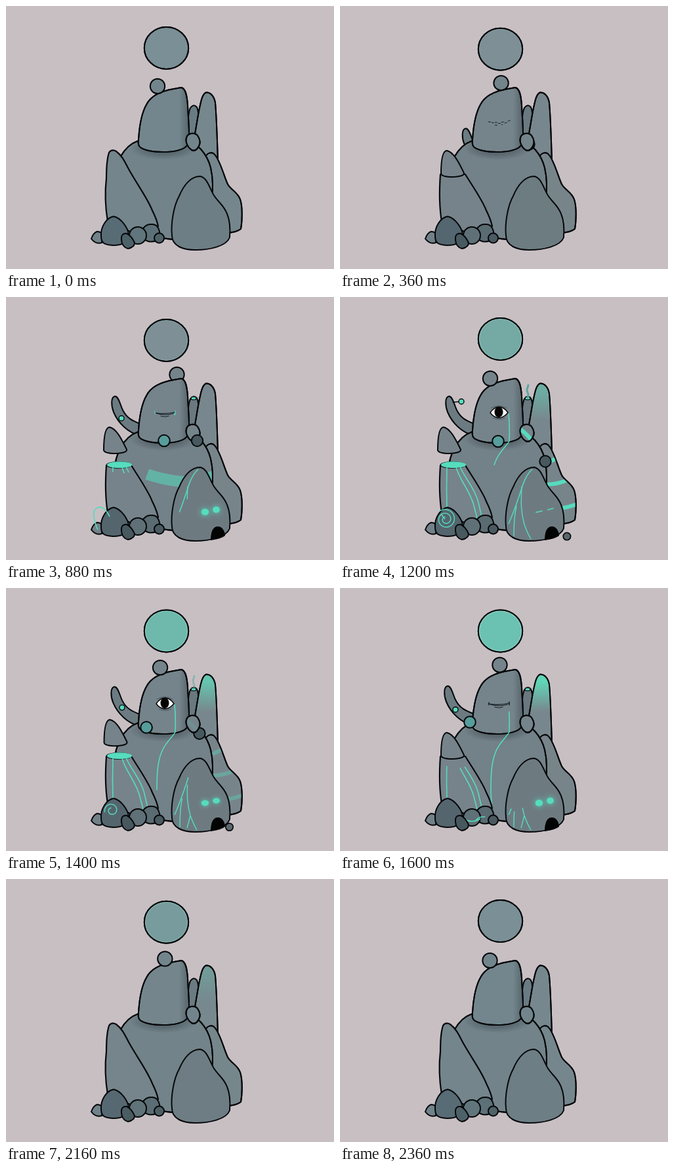
Recreate the animation shown at these times as an HTML page with a canvas. Size 500x400 px, loop 2.4 s.

```html
<!DOCTYPE html>
<html>
<head>
<meta charset="utf-8">
<style>
html, body { margin: 0; width: 100%; height: 100%; overflow: hidden; background: #c8bfc3; }
canvas { display: block; }
</style>
</head>
<body>
<canvas id="stage" width="500" height="400"></canvas>
<script>
const ctx = document.getElementById('stage').getContext('2d');
const LOOP = 2400, STEP = 40;
const INK = '#06080a', GLOW = '#56dcbe', ROCK = '#75848b';
let t = 0, calm = 0;

const shapes = {
  tallSpire: 'M323 236C322 205 321 168 319 147C317 136 311 131 305 131.5C299 134 297 145 294 160C291 176 289 190 286 205L300 240Z',
  shortSpire: 'M279 200C277 180 277 164 281 155Q286 148 291 154Q294 160 293 174L290 205Z',
  rightRock: 'M303 231C307 222 315 221 319 227C327 237 332 258 338 271C343 280 353 283 357 294C361 306 360 328 358 339Q352 344 338 345L308 310Z',
  horn: 'M203 210C187 207 171 192 164 175C160 165 160 152 166 151C172 151 174 164 178 172C184 184 192 188 205 193Z',
  body: 'M166 256C170 229 185 207 209 203H272C292 207 307 226 312 246C316 263 316 280 313 300L280 355Q245 357 226 349L180 310Z',
  head: 'M202 203C203 187 206 164 214 150C221 136 238 129 256 126L267 124C274 125 276 137 277 151C278 177 281 197 277 210C274 219 255 222 239 222C223 222 207 219 203 213Q201 209 202 203Z',
  diamond: 'M276 198C279 193 288 192 292 197C296 203 297 208 294 213C291 219 287 221 283 219C277 215 272 206 276 198Z',
  column: 'M155 328C152 310 150 288 153 262C153 246 154 232 157 223Q161 217 168 221C179 229 183 242 191 255C202 274 217 295 223 311Q230 325 232 335L205 350Z',
  stump: 'M155 328C152 310 151 284 153 256H191C202 274 217 295 223 311Q230 325 232 335L205 350Z',
  cap: 'M154 255C154 242 155 220 163 220C174 222 183 242 189 254Q190 259 172 260Q155 260 154 255Z',
  frontRock: 'M253 349C251 330 256 303 264 289C271 272 282 259 296 259C307 261 310 277 317 288C324 299 332 303 337 316C342 328 342 340 341 352C336 365 312 371 288 371C270 371 253 365 253 349Z',
  stoneE: 'M208 340Q213 331 222 332Q231 331 234 343Q236 353 229 357Q217 361 210 354Z',
  stoneW: 'M130 354Q133 345 139 343Q146 343 147 350L146 360Q137 363 130 354Z',
  boulder: 'M145 350C144 336 153 322 164 320C175 322 187 338 187 349C186 361 175 364 163 364C150 363 145 361 145 350Z',
  chip: 'M176 356Q175 345 184 346Q191 349 196 360Q196 367 186 369Q177 367 176 356Z',
  almond: 'M229 176Q235 167 243 167Q251 168 256 176Q249 184 242 184Q234 183 229 176Z',
  door: 'M312 370C312 356 316 349 323 349C330 349 334 357 334 363Q328 368 312 370Z'
};
for (const k in shapes) shapes[k] = new Path2D(shapes[k]);

function spiral() {
  let d = 'M';
  for (let i = 0; i <= 60; i++) {
    const a = -2.3 + i * .22, r = 15.5 - i * .2;
    d += `${i ? 'L' : ''}${161 + r * Math.cos(a)} ${338 + r * Math.sin(a)}`;
  }
  return d;
}

// Glowing lines with their measured lengths
const line = d => {
  const el = document.createElementNS('http://www.w3.org/2000/svg', 'path');
  el.setAttribute('d', d);
  return { path: new Path2D(d), length: el.getTotalLength() };
};
const lines = {
  tear: line('M257 177Q259 200 258 219C255 226 243 234 237 250C230 267 230 290 230 312L233 354'),
  belt: line('M164 236C188 264 225 276 268 281Q300 281 322 270'),
  vine: line('M293 262C281 273 278 289 273 303C268 318 264 329 257 345'),
  vineB: line('M277 288C276 310 275 325 281 346Q286 360 291 368'),
  vineC: line('M269 318C265 335 265 350 265 364'),
  vineD: line('M281 346L276 365'),
  streamA: line('M163 259Q162 290 163 323'),
  streamB: line('M177 259C182 278 199 296 204 317L209 336'),
  streamC: line('M183 258C189 274 207 292 212 317L216 334'),
  pool: line('M188 350Q200 359 214 351'),
  poolB: line('M207 353Q214 346 224 349T240 350'),
  arch: line('M140 354C135 343 129 324 140 320C149 318 154 326 158 334'),
  spiral: line(spiral()),
  needle: line('M154 330L160 338')
};

const clamp = x => Math.max(0, Math.min(1, x));
const ease = x => x * x * (3 - 2 * x);
const linear = (a, b) => clamp((t - a) / (b - a));
const ramp = (a, b) => ease(linear(a, b));
const pulse = (a, b, c, d) => ramp(a, b) * (1 - ramp(c, d));

// Eased value of rows [time, ...values]
function keys(...rows) {
  let i = rows.findIndex(r => r[0] > t);
  if (i < 0) return rows[rows.length - 1].slice(1);
  if (i === 0) return rows[0].slice(1);
  const a = rows[i - 1], b = rows[i], k = ease((t - a[0]) / (b[0] - a[0]));
  return a.slice(1).map((v, n) => v + (b[n + 1] - v) * k);
}

function scoped(draw) { ctx.save(); draw(); ctx.restore(); }

function outline(path, width = 2, color = INK) {
  ctx.lineWidth = width;
  ctx.strokeStyle = color;
  ctx.stroke(path);
}

function rock(path, fill = ROCK, width = 2) {
  ctx.fillStyle = fill;
  ctx.fill(path);
  ctx.fillStyle = `rgba(105,145,150,${.17 * calm})`;
  ctx.fill(path);
  outline(path, width);
}

function oval(x, y, rx, ry = rx) {
  const p = new Path2D();
  p.ellipse(x, y, Math.max(0, rx), Math.max(0, ry), 0, 0, 7);
  return p;
}

function fade(x0, y0, x1, y1, from, to) {
  const g = ctx.createLinearGradient(x0, y0, x1, y1);
  g.addColorStop(0, from);
  g.addColorStop(1, to);
  return g;
}

function trace(name, tail, tip, width = 1.6, color = GLOW) {
  if (tip <= tail) return;
  const { path, length } = lines[name];
  scoped(() => {
    ctx.lineCap = 'butt';
    ctx.setLineDash([(tip - tail) * length, length * 2]);
    ctx.lineDashOffset = -tail * length;
    outline(path, width, color);
  });
}

function stroke(d, width, color) { outline(new Path2D(d), width, color); }

function orb(glow) {
  const y = 64.9 - Math.cos(t * Math.PI / 300);
  const disc = oval(244.5, y, 33.7, 32);
  rock(disc, '#7e8f96');
  ctx.fillStyle = `rgba(104,208,186,${.8 * glow})`;
  ctx.fill(disc);
  outline(oval(244.5, y, 32, 30.4), 1.2, `rgba(150,215,203,${.3 * pulse(200, 600, 2100, 2400) + .5 * glow})`);
  outline(disc);
}

function backdrop(glow) {
  rock(shapes.shortSpire, '#6a787f');
  const vent = pulse(680, 840, 1640, 1800);
  if (vent > 0) {
    const hole = oval(286, 154, 4 * vent, 2.4 * vent);
    ctx.fillStyle = GLOW;
    ctx.fill(hole);
    outline(hole, 1.2);
  }
  const smoke = pulse(960, 1180, 1300, 1500);
  if (smoke > 0) scoped(() => {
    ctx.globalAlpha = smoke;
    stroke('M286 153C290 147 282 143 286 138L287 134', 3, '#5aa7a0');
  });
  rock(shapes.tallSpire, '#78878d');
  ctx.fillStyle = fade(0, 142, 0, 188, `rgba(94,222,188,${.9 * glow})`, 'rgba(94,222,188,0)');
  ctx.fill(shapes.tallSpire);
  outline(shapes.tallSpire);

  rock(shapes.rightRock, '#77858b');
  const bands = pulse(980, 1160, 1280, 1480);
  if (bands > 0) scoped(() => {
    ctx.clip(shapes.rightRock);
    ctx.globalAlpha = bands;
    stroke('M316 252L331 245M315 285Q331 285 345 279M335 322Q348 320 362 315', 6, GLOW);
  });
  outline(shapes.rightRock);
}

function horn() {
  const [dx, dy] = keys([240, 42, 58], [520, 0, 0], [1240, 0, 0], [1600, -2, -2], [1720, 0, 2], [1920, 34, 46], [2040, 42, 58]);
  if (dx < 42) scoped(() => {
    ctx.translate(dx, dy);
    rock(shapes.horn, '#6c7b82');
  });
  if (t < 440 || t > 2040) return;
  const [x, y] = keys([440, 186, 200], [560, 176, 183.5], [920, 176, 184.5], [1120, 185, 159], [1240, 185, 159],
    [1440, 176, 184.5], [1640, 176, 185], [1920, 182.5, 214], [2040, 190, 228]);
  const stalk = pulse(960, 1080, 1280, 1400);
  if (stalk > .2) stroke(`M172 160L${x} ${y}`, 1.3);
  const bead = oval(x, y, 4);
  ctx.fillStyle = GLOW;
  ctx.fill(bead);
  outline(bead, 1.4);
}

function body() {
  rock(shapes.body, '#738188');
  scoped(() => {
    ctx.clip(shapes.body);
    trace('belt', linear(640, 1140) * .75 + linear(1000, 1120) * .25, linear(360, 720), 17, '#63b2a6');
    ctx.translate(240, 216);
    ctx.scale(1, .35);
    const shade = ctx.createRadialGradient(0, 0, 15, 0, 0, 52);
    shade.addColorStop(0, 'rgba(25,35,40,.4)');
    shade.addColorStop(1, 'rgba(25,35,40,0)');
    ctx.fillStyle = shade;
    ctx.fillRect(-60, -60, 120, 120);
  });
  outline(shapes.body);
}

function eye() {
  if (t < 280 || t > 2120) return;
  const open = pulse(400, 540, 780, 880) + pulse(900, 1040, 1440, 1580);
  if (open > .05) scoped(() => {
    ctx.translate(0, 176 * (1 - open));
    ctx.scale(1, open);
    ctx.fillStyle = '#f6f5f3';
    ctx.fill(shapes.almond);
    scoped(() => {
      ctx.clip(shapes.almond);
      ctx.fillStyle = '#050506';
      ctx.fill(oval(242, 175, 6.5, 8.2));
    });
    outline(shapes.almond, 1.5);
    stroke('M230 169Q242 162 254 169M233 184Q243 189 252 184', .7, '#3c474c');
  });
  else if (t < 400 || t > 1700) scoped(() => {
    ctx.globalAlpha = pulse(240, 360, 1920, 2120);
    ctx.lineCap = 'butt';
    ctx.setLineDash([4, 6]);
    stroke('M226 176Q242 179 260 174M231 177Q242 180 256 177M236 181Q242 182 248 180', 1, '#172024');
  });
  else {
    stroke('M227 176Q242 179 258 175M229 177Q242 181 256 177M236 181Q242 183 248 181', 1.2, '#172024');
    stroke('M227 174V178M258 173V178', 1.2, t < 1000 ? GLOW : INK);
  }
}

function head() {
  const [x, y] = keys([0, 231, 122], [400, 246, 117], [600, 262.5, 120], [740, 264, 120], [880, 260.5, 118],
    [1200, 229, 124], [1240, 229, 124], [1600, 243.5, 117], [1780, 262, 119], [1920, 260.5, 118], [2360, 228.5, 124], [2400, 231, 122]);
  const topBall = () => rock(oval(x, y, 11.2));
  const [nx, ny] = keys([360, 215, 201], [520, 199, 204], [600, 202.5, 208.5], [820, 241, 218.5], [1220, 241, 219.5],
    [1500, 203, 209], [1600, 198, 204], [1760, 215, 201]);
  const neckBall = () => rock(oval(nx, ny, 8.8), '#579d9b');
  const neckFront = t >= 520 && t <= 1620;

  if (x >= 255) topBall();
  if (!neckFront && t > 360 && t < 1760) neckBall();
  rock(shapes.head);
  ctx.fillStyle = fade(264, 0, 282, 0, 'rgba(25,35,40,0)', 'rgba(25,35,40,.4)');
  ctx.fill(shapes.head);
  outline(shapes.head);
  if (x < 255) topBall();
  eye();
  trace('tear', linear(1570, 2100), linear(870, 1580), 1.6);
  if (neckFront) neckBall();
}

function shoulder() {
  const [x, y] = keys([320, 286, 207], [560, 313, 250], [640, 313, 250], [880, 291.5, 218.5], [1120, 313, 250], [1240, 313, 250], [1500, 286, 207]);
  const ball = () => rock(oval(x, y, 8.7), '#47595f');
  const front = t >= 480 && t <= 1360;
  if (!front) ball();
  rock(shapes.diamond);
  const stripe = pulse(960, 1160, 1240, 1440);
  if (stripe > 0) scoped(() => {
    ctx.clip(shapes.diamond);
    ctx.globalAlpha = stripe;
    stroke('M273 200Q284 207 293 219', 6, GLOW);
  });
  outline(shapes.diamond);
  if (front) ball();
}

function column() {
  const lift = pulse(360, 560, 1360, 1560);
  const tint = '#76838a';
  if (t < 320 || t > 1800) rock(shapes.column, tint, 2.2);
  else {
    rock(shapes.stump, tint, 2.2);
    if (lift > .03) {
      const full = ramp(600, 760), rim = oval(172, 255.5, 18.5, 4.5);
      ctx.fillStyle = tint;
      ctx.fill(rim);
      outline(rim, 1.8);
      ctx.fillStyle = GLOW;
      ctx.fill(oval(173, 255.3, 12 + 7 * full, 2.7 + 2.3 * full));
    }
    scoped(() => {
      ctx.translate(-5 * lift, -22 * lift);
      rock(shapes.cap, tint);
    });
  }
  const tail = linear(1540, 1860), tip = linear(840, 1180);
  for (const name of ['streamA', 'streamB', 'streamC']) trace(name, tail, tip);
}

function frontRock() {
  // The pebble rolls out from behind the rock and back
  if (t > 1000 && t < 1500) {
    const [x, y] = keys([1000, 324, 362], [1180, 345, 364], [1300, 357, 365], [1500, 324, 362]);
    rock(oval(x, y, 5.7), '#5a686d', 1.7);
  }
  rock(shapes.frontRock, '#6d7b81');
  trace('vine', linear(1280, 1640), linear(580, 960), 1.5);
  trace('vineB', linear(1340, 1800), linear(800, 1140), 1.4);
  trace('vineC', linear(1380, 1840), linear(880, 1160), 1.4);
  trace('vineD', linear(1600, 1760), linear(1220, 1400), 1.4);

  if (t > 400 && t < 2080) {
    const open = pulse(600, 760, 1040, 1160) + pulse(1280, 1440, 1700, 1840);
    scoped(() => {
      if (open > .08) {
        ctx.shadowColor = GLOW;
        ctx.shadowBlur = 8 * open;
        ctx.fillStyle = GLOW;
        ctx.fill(oval(303.5, 327, 5.7, 5 * open));
        ctx.fill(oval(320.5, 323.5, 5.4, 4.8 * open));
      } else {
        const fading = t > 1800;
        ctx.globalAlpha = pulse(400, 540, 1900, 2080);
        if (fading) ctx.setLineDash([2, 4]);
        stroke('M299 327.5L308 325.5M317 323.5L325 321.5', fading ? 1 : 1.5, fading ? '#62968f' : GLOW);
      }
    });
  }
  const door = pulse(600, 780, 1700, 1900);
  if (door > .02) scoped(() => {
    ctx.translate(324 * (1 - door), 368 * (1 - door));
    ctx.scale(door, door);
    ctx.fillStyle = '#020303';
    ctx.fill(shapes.door);
  });
  else if (t > 480 && t < 640) stroke('M323 348L324 352M324 354V364', 1.3);
  else if (t > 1860 && t < 2040) stroke('M325 359V365', 1.3);
}

function stones() {
  rock(shapes.stoneE, '#5a6b72');
  rock(oval(201, 349, 13), '#5f7077');
  rock(oval(233.5, 353, 7.5), '#4a5a60');
  trace('pool', linear(1600, 1800), linear(1360, 1560));
  trace('poolB', linear(1920, 2160), linear(1480, 1680) * .75 + linear(1680, 1840) * .25, 1.5);
  rock(shapes.stoneW, '#728189');
  rock(shapes.boulder, '#54656e');
  rock(shapes.chip, '#48585f');
  trace('arch', linear(900, 1120), linear(520, 860), 1.7);
  trace('spiral', linear(1260, 1520), linear(880, 1160), 1.4);
  trace('needle', linear(1260, 1400), linear(880, 1000), 1.4);
}

function frame(now) {
  t = Math.floor(now % LOOP / STEP) * STEP;
  calm = 1 - pulse(80, 440, 2000, 2320);
  const [glow] = keys([900, 0], [1200, .5], [1560, 1], [1640, 1], [1920, .68], [2320, 0]);
  ctx.fillStyle = '#c8bfc3';
  ctx.fillRect(0, 0, 500, 400);
  ctx.lineJoin = ctx.lineCap = 'round';
  orb(glow);
  backdrop(glow);
  horn();
  body();
  head();
  shoulder();
  column();
  frontRock();
  stones();
  requestAnimationFrame(frame);
}
requestAnimationFrame(frame);
</script>
</body>
</html>
```
